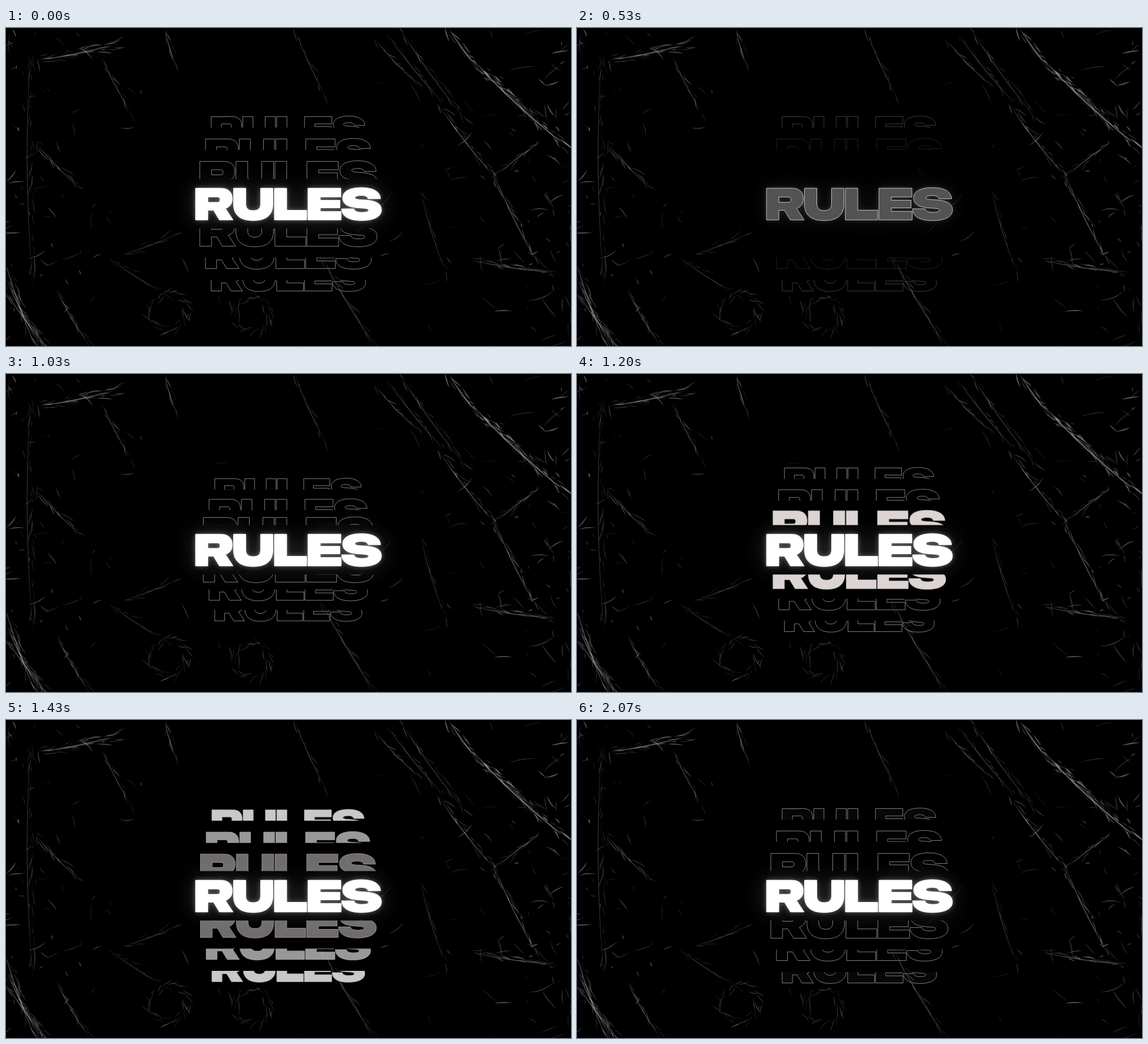
Recreate the animation shown at these times as an HTML page. Size 960 by 540 pixels, loop 2.17 s.

```html
<!DOCTYPE html>
<html lang="en">
<head>
<meta charset="utf-8">
<title>Rules</title>
<style>
  html, body { margin: 0; width: 100%; height: 100%; overflow: hidden; background: #000; }
  svg { display: block; width: 100vw; height: 100vh; }
  .letter { vector-effect: non-scaling-stroke; }
</style>
</head>
<body>
<svg viewBox="0 0 960 540" role="img" aria-label="RULES">
  <defs>
    <path id="R" class="letter" fill-rule="evenodd" d="M322 272H365C378 272 384.500 279 384.500 290C384.500 299 380 304 373 306.500L386 326H362.500L352.500 309.500H343V326H322ZM343 287V296H359.500C362.500 296 363.500 294 363.500 291.500C363.500 289 362.500 287 359.500 287Z"/>
    <path id="U" class="letter" d="M386.500 272H407.500V298C407.500 306 411 310 420 310C429 310 432.500 306 432.500 298V272H453.500V299C453.500 317 443 327 420 327C397 327 386.500 317 386.500 299Z"/>
    <path id="L" class="letter" d="M456 272H477V309.500H511V326H456Z"/>
    <path id="E" class="letter" d="M513 272H569V287H534V292.500H567.500V305.500H534V311.500H569.500V326H513Z"/>
    <path id="S" class="letter" d="M638 309C638 320 626 327 604 327C582 327 571 320 570 307H591.500C592 311 597 313 605 313C613 313 616 311.500 616 309.500C616 307 613 306.500 605 306L598 305.500C580 304 572 299 572 288.500C572 277 584 271 604 271C624 271 636 278 636.500 290H615C614 286 610 284.500 604 284.500C597 284.500 593 286 593 288C593 290.500 596 291 603 291.500L611 292C629 293.500 638 298 638 309Z"/>
    <g id="word"><use href="#R"/><use href="#U"/><use href="#L"/><use href="#E"/><use href="#S"/></g>
    <filter id="near" x="-20%" y="-60%" width="140%" height="220%"><feGaussianBlur stdDeviation="4"/></filter>
    <filter id="far" x="-40%" y="-200%" width="180%" height="500%"><feGaussianBlur stdDeviation="19"/></filter>
    <radialGradient id="shade">
      <stop offset=".4" stop-opacity=".75"/>
      <stop offset="1" stop-opacity="0"/>
    </radialGradient>
  </defs>
  <rect width="960" height="540"/>
  <g id="foil" fill="#d8d8d8"></g>
  <ellipse cx="480" cy="299" rx="230" ry="125" fill="url(#shade)"/>
  <g id="rows"></g>
  <g id="glow" fill="#fff">
    <use href="#word" filter="url(#far)" opacity=".2"/>
    <use href="#word" filter="url(#near)" opacity=".38"/>
  </g>
  <use href="#word"/>
  <g id="main"></g>
</svg>
<script>
const LOOP = 2170, MID = 298.5;
const $ = id => document.getElementById(id);
const clamp = v => Math.max(0, Math.min(1, v));
const ramp = (t, a, b) => clamp((t - a) / (b - a));

function set(el, attrs) {
  for (const key in attrs) el.setAttribute(key, attrs[key]);
}
function add(parent, tag, attrs) {
  const el = document.createElementNS('http://www.w3.org/2000/svg', tag);
  set(el, attrs);
  return parent.appendChild(el);
}

// Crumpled foil, built from tapered slivers.
let seed = 41;
const rnd = () => (seed = (seed * 16807) % 2147483647) / 2147483647;
const spread = size => (rnd() - .5) * 2 * size;

function sliver(x, y, angle, len, bend, width, light) {
  const dx = Math.cos(angle) * len, dy = Math.sin(angle) * len;
  const at = b => `${x + dx / 2 - Math.sin(angle) * b} ${y + dy / 2 + Math.cos(angle) * b}`;
  add($('foil'), 'path', {
    d: `M${x} ${y}Q${at(bend + width)} ${x + dx} ${y + dy}Q${at(bend - width)} ${x} ${y}Z`,
    'fill-opacity': light
  });
}

// A long crease with chips of light along it.
function fold(x1, y1, x2, y2, weight) {
  const angle = Math.atan2(y2 - y1, x2 - x1), len = Math.hypot(x2 - x1, y2 - y1);
  sliver(x1, y1, angle, len, len * .04, .7 + weight * .5, .2 + weight * .06);
  for (let d = 0; d < len; d += 13 / weight) {
    const x = x1 + Math.cos(angle) * d + spread(weight * 2);
    const y = y1 + Math.sin(angle) * d + spread(weight * 2);
    sliver(x, y, angle + spread(.35), 8 + rnd() * 22, spread(3), .4 + rnd() * weight * .7, .1 + rnd() * .3);
  }
}

const folds = [
  [752, 0, 800, 66, 3], [795, 56, 946, 196, 4], [830, 250, 902, 396, 2],
  [908, 194, 836, 248, 2], [735, 130, 830, 252, 2], [790, 394, 930, 415, 2],
  [535, 385, 628, 540, 1.5], [490, 0, 542, 114, 1], [704, 275, 746, 412, 1],
  [55, 54, 184, 28, 3], [162, 48, 211, 142, 1.5], [270, 4, 285, 54, 2],
  [42, 40, 46, 440, 1], [50, 195, 122, 269, 1.5], [85, 444, 142, 540, 1.5],
  [175, 390, 263, 448, 1], [200, 384, 290, 350, 1]
];
for (const f of folds) fold(...f);
for (let k = 0; k < 3; k++) {
  fold(625 + k * 22, 18 - k * 9, 705 + k * 36, 100 + k * 25, 1.2);
  fold(0, 400 + k * 24, 50 + k * 9, 540, 2.2);
}

// Loose crinkles, thick at both sides and thin towards the middle.
for (let i = 0; i < 1100; i++) {
  const x = rnd() * 960, y = rnd() * 540, side = Math.abs(x - 480) / 480;
  if (rnd() > .04 + side ** 6) continue;
  const angle = rnd() < .6 ? 1.1 + spread(.5) : 2.7 + spread(.5);
  const len = 7 + rnd() * rnd() * 45;
  sliver(x, y, angle, len, spread(len * .2), .5 + rnd() * 1.8, (.12 + rnd() * .32) * (.5 + side / 2));
}

// Two crumpled knots under the lettering.
for (const x of [278, 416]) {
  for (let a = 0; a < 6.28; a += .2) {
    const r = 22 + rnd() * 18;
    sliver(x + Math.cos(a) * r, 485 + Math.sin(a) * r, a + 1.6 + spread(.5), 8 + rnd() * 20, 2, .4 + rnd(), .15 + rnd() * .2);
  }
}

// Echo rows, nearest first; reach is the distance of the outer edge from MID.
const rows = [0, 1, 2].map(i => ({
  reach: 72.5 + 38 * i,
  scale: .953 - .0615 * i,
  start: 880 - 40 * i,
  lag: 100 * i,
  sides: [-1, 1].map(dir => {
    const id = `cut${i}${dir < 0 ? 'a' : 'b'}`;
    const cut = add(add($('rows'), 'clipPath', { id }), 'rect', { x: 300, width: 360 });
    const box = add($('rows'), 'g', { 'clip-path': `url(#${id})` });
    const word = add(box, 'use', {
      href: '#word', fill: i ? '#eee' : '#f2e8e8', stroke: '#b4b4b4', 'stroke-width': .7
    });
    return { dir, cut, word };
  })
}));

const letters = [...'RULES'].map((ch, i) => ({
  el: add($('main'), 'use', { href: '#' + ch, 'stroke-width': 1 }),
  start: 690 + Math.abs(i - 2) * 70
}));

function drawRow({ reach, scale, start, lag, sides }, i, t) {
  const leaving = t < 700;
  const left = leaving ? 0 : Math.exp(-Math.max(0, t - start) / 155);
  const outer = reach - (reach - 27) * left;
  const inner = i ? Math.max(42, outer - 19) : 42;
  const size = scale - (leaving ? 0 : .055 * (1 - ramp(t, 870, 1630)) ** 1.5);
  const flash = leaving ? 0 : ramp(t - lag, 1110, 1162) * (1 - ramp(t - lag, 1162, 2009)) ** 2;
  const line = leaving ? 1 - ramp(t, 200 + i * 75, 540 + i * 75) : ramp(t, 780, 1020);
  for (const { dir, cut, word } of sides) {
    const cy = MID + dir * (outer - 27.5 * size);
    set(cut, { y: dir < 0 ? MID - outer - 2 : MID + inner, height: Math.max(0, outer + 2 - inner) });
    set(word, {
      transform: `translate(479.8 ${cy}) scale(${size}) translate(-480 -299)`,
      'fill-opacity': flash, 'stroke-opacity': line
    });
  }
}

function draw(t) {
  rows.forEach((row, i) => drawRow(row, i, t));
  const fade = 1 - ramp(t, 200, 692);
  let sum = 0;
  for (const { el, start } of letters) {
    const fill = t < 690 ? fade : ramp(t, start, start + 100);
    const warm = t < 690 ? 255 : 233 + 22 * fill;
    const color = `rgb(255,${warm},${warm})`;
    set(el, { fill: color, 'fill-opacity': fill, stroke: color, 'stroke-opacity': .55 + .33 * fill });
    sum += fill;
  }
  set($('glow'), { opacity: .15 + .85 * sum / letters.length });
}

const begin = performance.now();
function tick() {
  draw((performance.now() - begin) % LOOP);
  requestAnimationFrame(tick);
}
tick();
</script>
</body>
</html>
```
